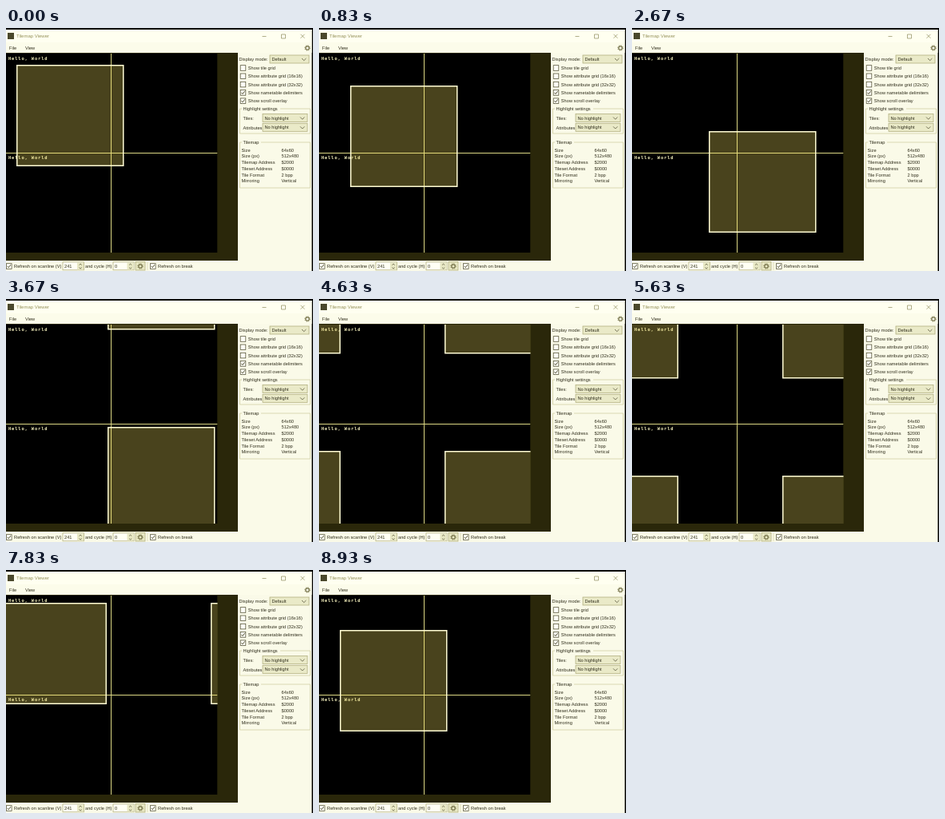
These frames come from a looping animation (384x304 px, 8960 ms). An HTML page:

```html
<!DOCTYPE html>
<html lang="en">
<head>
<meta charset="utf-8">
<title>Tilemap Viewer</title>
<style>
  html, body { margin: 0; width: 100%; height: 100%; overflow: hidden; background: #000; }
  svg { display: block; width: 384px; height: 304px; }
  text { font: 5.68px "Liberation Sans", Arial, sans-serif; fill: #302e1c; }
  .title { font-size: 6px; fill: #96925c; }
  .tiles { font: bold 5.4px "DejaVu Sans Mono", monospace; letter-spacing: .87px; fill: #f4f0bc; }
</style>
</head>
<body>
<svg id="stage" viewBox="0 0 384 304">
  <defs><clipPath id="mapClip"><rect x="0" y="32" width="264.5" height="249"/></clipPath></defs>
  <g id="chrome"></g>
  <rect x="0" y="31" width="290" height="260" fill="#2a270a"/>
  <g clip-path="url(#mapClip)">
    <rect x="0" y="32" width="264.5" height="249"/>
    <text class="tiles" x="3" y="40">Hello, World</text>
    <text class="tiles" x="3" y="164.2">Hello, World</text>
    <path d="M131.5 32V281M0 156.5H264.5" stroke="#dcd884" fill="none"/>
    <g id="scroll"></g>
  </g>
  <g id="controls"></g>
</svg>
<script>
const NS = 'http://www.w3.org/2000/svg';
const chrome = document.getElementById('chrome');
const controls = document.getElementById('controls');
const scroll = document.getElementById('scroll');
const INK = '#45432a', EDGE = '#aaa776', PANEL = '#fafae8';

function add(parent, tag, attrs, content) {
  const el = document.createElementNS(NS, tag);
  for (const key in attrs) el.setAttribute(key, attrs[key]);
  if (content) el.textContent = content;
  parent.append(el);
  return el;
}
const rect = (x, y, width, height, fill, stroke = 'none', parent = controls) =>
  add(parent, 'rect', { x, y, width, height, fill, stroke, 'stroke-width': .7 });
const line = (d, stroke = INK, width = .7) =>
  add(controls, 'path', { d, stroke, 'stroke-width': width, fill: 'none' });
const label = (x, middle, content, cls = '') =>
  add(controls, 'text', { x, y: middle + 2, class: cls }, content);

function checkbox(x, middle, content, checked) {
  rect(x, middle - 3.3, 6.6, 6.6, '#fffff6', INK);
  if (checked) line(`M${x + 1.3} ${middle}l1.5 1.7 2.6-3.6`, INK, .9);
  label(x + 9.6, middle, content);
}

function dropdown(x, y, width, content) {
  rect(x, y, width, 10, '#eaeac8', EDGE);
  label(x + 2.5, y + 5, content);
  line(`M${x + width - 9} ${y + 4}l2.7 2.7 2.7-2.7`);
}

function group(y, height, content, gap) {
  line(`M295 ${y}H292.5V${y + height}H380.5V${y}H${gap}`, '#d2d0a4', .8);
  label(296.5, y, content);
}

function spinner(x, width, content) {
  rect(x, 292.8, width, 10, '#fffff4', EDGE);
  label(x + 2, 298, content);
  rect(x + width - 8.5, 293.5, 8, 8.8, '#e8e8c4');
  line(`M${x + width - 6} 296.6l1.6-1.5 1.6 1.5M${x + width - 6} 299.6l1.6 1.5 1.6-1.5`);
}

function gear(cx, cy) {
  add(controls, 'circle', { cx, cy, r: 2.2, fill: 'none', stroke: '#77744a', 'stroke-width': 1.2 });
  add(controls, 'circle', { cx, cy, r: 3.2, fill: 'none', stroke: '#77744a',
    'stroke-width': 1, 'stroke-dasharray': '1.2 1.31' });
}

function buildWindow() {
  rect(0, 2, 382.5, 302, PANEL, 'none', chrome);
  rect(0, 2, 382.5, 16, '#fffff0', 'none', chrome);
  rect(0, 18, 382.5, 13, '#fcfcea', 'none', chrome);

  rect(2, 6, 8, 8, '#4a482c');
  label(13, 10.3, 'Tilemap Viewer', 'title');
  line('M320.5 10.5h5M344.5 8h5v5h-5zM368.5 7.8l5 5m0-5l-5 5', '#8f8b5c');
  label(4, 25.3, 'File');
  label(24, 25.3, 'View');
  gear(377, 25);

  label(291.5, 39, 'Display mode:');
  dropdown(330, 34, 49, 'Default');
  ['Show tile grid', 'Show attribute grid (16x16)', 'Show attribute grid (32x32)',
   'Show nametable delimiters', 'Show scroll overlay']
    .forEach((name, i) => checkbox(293.2, 50 + i * 10.3, name, i > 2));

  group(101, 31, 'Highlight settings', 343);
  label(296.5, 113, 'Tiles:');
  dropdown(321, 107.5, 56, 'No highlight');
  label(296.5, 124.5, 'Attributes:');
  dropdown(321, 119.3, 56, 'No highlight');

  group(143, 57, 'Tilemap', 319);
  [['Size', '64x60'], ['Size (px)', '512x480'], ['Tilemap Address', '$2000'],
   ['Tileset Address', '$0000'], ['Tile Format', '2 bpp'], ['Mirroring', 'Vertical']]
    .forEach(([name, value], i) => {
      label(294.5, 152.5 + i * 7.75, name);
      label(344.5, 152.5 + i * 7.75, value);
    });

  checkbox(.5, 298, 'Refresh on scanline (V)', true);
  spinner(71, 26.5, '241');
  label(99, 298, 'and cycle (H)');
  spinner(134, 26, '0');
  rect(162, 292.5, 12, 10.5, '#e8e8c4', EDGE);
  gear(168, 298);
  line('M177 293v10', '#d2d0a4');
  checkbox(180.5, 298, 'Refresh on break', true);
}

const MAP = { width: 264.5, height: 248.5, top: 32 };
const BOX = { width: 134.5, height: 127 };
const LOOP = 8960, STEP = 1000 / 30, SPEED = 1.036;

// Neighbouring copies let the viewport wrap around the map edges.
for (const x of [0, -MAP.width])
  for (const y of [0, -MAP.height])
    add(scroll, 'rect', { x: x + .75, y: y + .75, width: BOX.width - 1.5, height: BOX.height - 1.5,
      fill: '#f0dc60', 'fill-opacity': .3, stroke: '#fffcd4', 'stroke-width': 1.5 });

function render(ms) {
  const travelled = Math.floor((ms % LOOP + 5) / STEP) * SPEED;
  const x = (13 + travelled) % MAP.width;
  const y = MAP.top + (46 - MAP.top + travelled) % MAP.height;
  scroll.setAttribute('transform', `translate(${Math.round(x)} ${Math.round(y)})`);
}

buildWindow();
const start = performance.now();
function tick() {
  render(performance.now() - start);
  requestAnimationFrame(tick);
}
tick();
</script>
</body>
</html>
```
